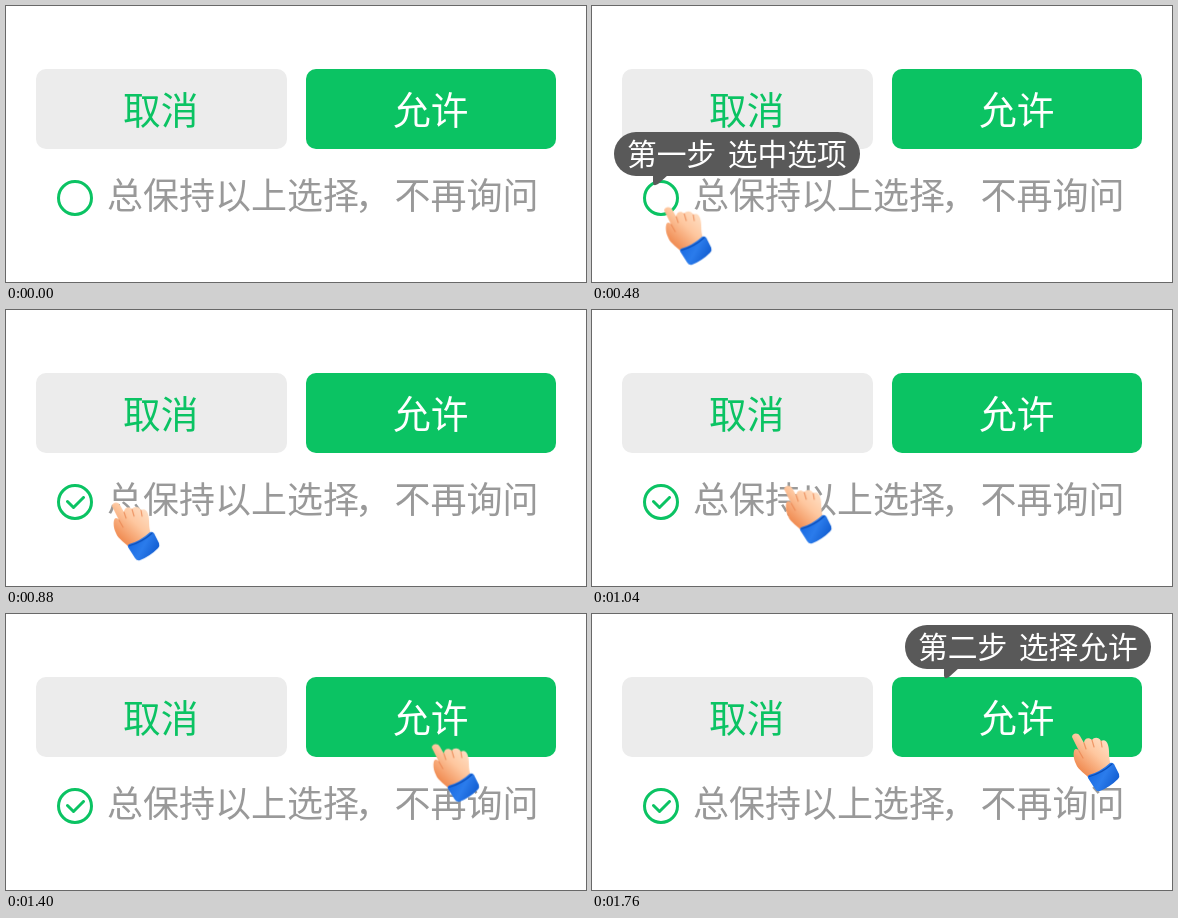
Write an HTML page that moves like this. It is 580x276 px and loops after 2.8 s.

```html
<!DOCTYPE html>
<html lang="zh-CN">
<head>
<meta charset="utf-8">
<style>
  html, body { margin: 0; width: 100%; height: 100%; overflow: hidden; background: #fff; }
  svg { display: block; width: 580px; height: 276px; }
  text { font-family: "Noto Sans CJK SC", "Noto Sans CJK", sans-serif; font-weight: 300; }
  .btn { font-size: 37.7px; text-anchor: middle; }
  .tip text { font-size: 29.8px; word-spacing: 4.6px; fill: #fff; }
  .tip { fill: #595959; }
  .tip, #tick, #hand { opacity: 0; }
  .line { fill: none; stroke: #0bc363; stroke-width: 3; stroke-linecap: round; stroke-linejoin: round; }
</style>
</head>
<body>
<svg viewBox="0 0 580 276">
  <defs>
    <linearGradient id="skin" x1="0.85" y1="0.1" x2="0.25" y2="0.85">
      <stop offset="0" stop-color="#ffe0c6"/>
      <stop offset="0.45" stop-color="#fec79f"/>
      <stop offset="1" stop-color="#f08a50"/>
    </linearGradient>
    <linearGradient id="cuff" x1="0" y1="0" x2="1" y2="0.5">
      <stop offset="0" stop-color="#1263de"/>
      <stop offset="0.6" stop-color="#2b7cec"/>
      <stop offset="1" stop-color="#145fd2"/>
    </linearGradient>
  </defs>

  <rect x="30" y="63" width="251" height="80" rx="10" fill="#ececec"/>
  <rect x="300" y="63" width="250" height="80" rx="10" fill="#0bc363"/>
  <text class="btn" x="154.700" y="118" fill="#0bc363">取消</text>
  <text class="btn" x="424.700" y="118" fill="#fff">允许</text>
  <text x="101" y="203" font-size="36" fill="#999">总保持以上选择<tspan dx="-4">，</tspan><tspan dx="3.500">不再询问</tspan></text>

  <circle class="line" cx="69" cy="192" r="16.5"/>
  <path class="line" id="tick" d="M61.5 191.5L67.5 197.5L77.5 187.5"/>

  <g class="tip" id="tip1">
    <rect x="22" y="126" width="246" height="44" rx="22"/>
    <path d="M61 169H76L66 178Q61 181 61 176Z"/>
    <text x="35" y="159">第一步 选中选项</text>
  </g>
  <g class="tip" id="tip2">
    <rect x="313" y="11" width="246" height="44" rx="22"/>
    <path d="M352 54H367L357 63Q352 66 352 61Z"/>
    <text x="326" y="44">第二步 选择允许</text>
  </g>

  <g id="hand">
    <path fill="url(#skin)" d="M0 3C0-1 6-2 8 2L12 9C12 4 17 3 20 6C22 3 27 3 29 7C32 5 35 7 36 11
      C38 17 36 23 39 31L18 45C14 40 6 36 4 30C2 26 1 21 2 17C3 14 6 15 7 17Z"/>
    <path fill="none" stroke="#ea8450" stroke-opacity=".75" stroke-width="1.2" stroke-linecap="round"
      d="M12 9L14 15M20 6L22 13M29 7L30 13M7 17L11 24"/>
    <path fill="url(#cuff)" d="M17 41Q28 38 38 29Q40 28 42 30L47 40Q48 43 46 45Q38 53 28 57Q25 58 23 55L16 44Q15 42 17 41Z"/>
    <path fill="none" stroke="#0a4db8" stroke-width="1.2" stroke-linecap="round" d="M17.5 42.5Q30 39 40 30"/>
  </g>
</svg>
<script>
  const LOOP = 2800;
  const SOFT = 'cubic-bezier(.37,0,.63,1)';

  // steps: [time, value, easing to the next step]
  function play(id, prop, steps) {
    const frames = steps.map(([t, value, easing = 'linear']) =>
      ({ offset: t / LOOP, [prop]: value, easing }));
    document.getElementById(id).animate(frames, { duration: LOOP, iterations: Infinity });
  }
  const at = (x, y) => `translate(${x}px, ${y}px)`;

  play('tip1', 'opacity', [[0, 0, 'step-end'], [80, 1, 'step-end'], [640, 0], [LOOP, 0]]);
  play('tip2', 'opacity', [[0, 0, 'step-end'], [1600, 1], [LOOP, 1]]);
  play('tick', 'opacity', [[0, 0], [640, 0], [800, 1], [LOOP, 1]]);
  play('hand', 'opacity', [[0, 0], [80, 0], [290, 1], [LOOP, 1]]);
  play('hand', 'transform', [
    [0, at(99, 209.5)], [80, at(99, 209.5), SOFT],
    [600, at(68.5, 200.5)], [700, at(68.5, 200.5), SOFT],
    [1620, at(480, 120)], [LOOP, at(480, 120)]
  ]);
</script>
</body>
</html>
```
